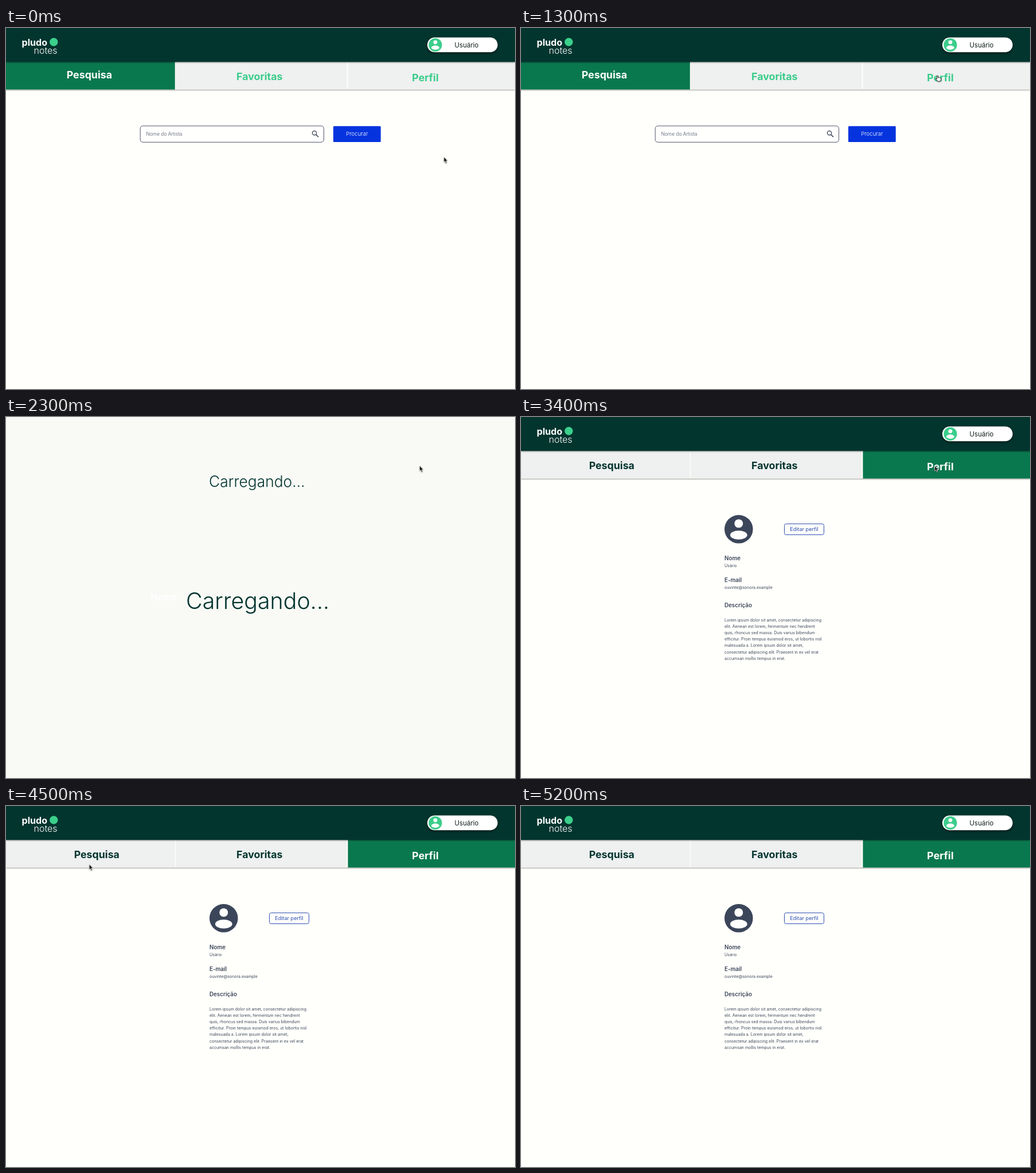
Write an HTML page that moves like this. It is 888 by 630 pixels and loops after 6400 ms.

```html
<!DOCTYPE html>
<html lang="pt-BR">
<head>
<meta charset="utf-8">
<title>Perfil</title>
<style>
  html, body { margin: 0; width: 100%; height: 100%; overflow: hidden; background: #fffffb; }
  svg { display: block; width: 888px; height: 630px; font-family: Inter, Roboto, sans-serif; }
  .bold { font-weight: 700; font-size: 17.8px; }
  .light { font-weight: 300; }
  .label { font-weight: 600; font-size: 9.8px; }
  .small { font-size: 7px; }
  .tabs { text-anchor: middle; }
  .bar { filter: drop-shadow(0 1.5px 1px #0007); }
  .pill { filter: drop-shadow(0 2px 2px #0008); }
  #arrow, #hand { filter: drop-shadow(0 1px 1px #0005); }
</style>
</head>
<body>
<svg viewBox="0 0 888 630">
  <defs>
    <g id="avatar">
      <circle r="10"/>
      <circle cy="-4" r="3" fill="#fffffd"/>
      <ellipse cy="4.1" rx="6" ry="3.15" fill="#fffffd"/>
    </g>
  </defs>

  <g id="search">
    <g id="searchTabs" class="bold tabs"></g>
    <rect x="234.2" y="170.9" width="320.3" height="28.4" rx="4.5" fill="#fffffe" stroke="#3d4558" stroke-width=".9"/>
    <text class="light" x="244.5" y="188" font-size="8.4" fill="#4c5365">Nome do Artista</text>
    <g transform="translate(538 183.3)" fill="none" stroke="#2f374a" stroke-width="1.2">
      <circle r="3.6"/><path d="M2.7 2.7 7 7" stroke-width="1.6"/>
    </g>
    <rect x="571" y="171.2" width="82.8" height="27.8" rx="1.5" fill="#0534df"/>
    <text class="light" x="612.4" y="188.4" font-size="9.6" text-anchor="middle" fill="#fff">Procurar</text>
  </g>

  <g id="profile" fill="#3c465a">
    <g id="profileTabs" class="bold tabs"></g>
    <use href="#avatar" transform="translate(379.8 195.8) scale(2.48)"/>
    <rect x="459.5" y="186.5" width="69" height="19" rx="3" fill="none" stroke="#2f4fb4"/>
    <text x="494" y="199" font-size="9.1" text-anchor="middle" fill="#2f4fb4">Editar perfil</text>
    <text class="label" x="355" y="249.8">Nome</text>
    <text class="small" x="355" y="262">Usário</text>
    <text class="label" x="355" y="288">E-mail</text>
    <text class="small" x="355" y="300.3">ouvinte@sonora.example</text>
    <text class="label" x="355" y="332.3">Descrição</text>
    <g id="description" class="small"></g>
  </g>

  <g id="header">
    <rect class="bar" width="888" height="59.2" fill="#03352f"/>
    <text class="bold" x="27.5" y="31" fill="#fff" style="font-size:16.1px">pludo</text>
    <text class="light" x="48.5" y="45" fill="#fff" font-size="16">notes</text>
    <circle cx="83.3" cy="24.5" r="7.2" fill="#3bd08c"/>
    <rect class="pill" x="735" y="16.5" width="122.7" height="25.8" rx="12.9" fill="#fff"/>
    <use href="#avatar" transform="translate(749 29.5) scale(1.16)" fill="#3bcd8b"/>
    <text x="782.5" y="33.5" font-size="11.5" fill="#10201d">Usuário</text>
  </g>

  <g id="loading">
    <rect width="888" height="630" fill="#f9faf6"/>
    <text class="label" x="252.5" y="319.5" fill="#fff" style="font-size:16px">Nome</text>
    <g class="light" fill="#03352f">
      <text x="354" y="122" font-size="26.4">Carregando...</text>
      <text x="314" y="335" font-size="39.4">Carregando...</text>
    </g>
  </g>

  <g id="pointer">
    <path id="arrow" fill="#171717" stroke="#fff" stroke-width=".6"
      d="M0 0V9.3L2 7.5 3.6 11.2 5.1 10.5 3.6 6.9H6.4z"/>
    <path id="hand" transform="translate(-3 -1)" fill="#fff" stroke="#222" stroke-width=".9" stroke-linejoin="round"
      d="M3 6.8V1.4Q3 .5 3.9 .5T4.8 1.4V4Q6 3.2 6.7 4.1 7.8 3.5 8.4 4.5 10.2 4 10.2 5.6V7.5L9.2 10.5H4.4L1 6.6Q.8 5.4 2 5.8z"/>
  </g>
</svg>
<script>
const LOOP = 6400, STEP = 100;
const HOVER = 900, LOADING = 2300, PROFILE = 3400, LEAVE = 5200;
const $ = id => document.getElementById(id);

function tab(label, x, width, center, baseline, fill, color) {
  return `<rect x="${x}" y="59" width="${width}" height="48.4" fill="${fill}"/>
    <text x="${center}" y="${baseline}" fill="${color}">${label}</text>`;
}

// The selected Pesquisa label sits a little up and to the left.
function tabs(selected, idleColor) {
  const style = name => name === selected ? ['#0a784f', '#fff'] : ['#eff0f0', idleColor];
  const label = selected === 'Pesquisa' ? [145.4, 88.3] : [158.3, 91];
  return '<rect class="bar" y="59" width="888" height="48.4" fill="#fffffb"/>' +
    tab('Pesquisa', 0, 294.8, ...label, ...style('Pesquisa')) +
    tab('Favoritas', 296, 298.5, 442.3, 91, ...style('Favoritas')) +
    tab('Perfil', 596.5, 291.5, 731.5, 93.3, ...style('Perfil'));
}
$('searchTabs').innerHTML = tabs('Pesquisa', '#3bcd8b');
$('profileTabs').innerHTML = tabs('Perfil', '#03352f');

$('description').innerHTML = [
  'Lorem ipsum dolor sit amet, consectetur adipiscing',
  'elit. Aenean est lorem, fermentum nec hendrerit',
  'quis, rhoncus sed massa. Duis varius bibendum',
  'efficitur. Proin tempus euismod eros, ut lobortis nisl',
  'malesuada a. Lorem ipsum dolor sit amet,',
  'consectetur adipiscing elit. Praesent in ex vel erat',
  'accumsan mollis tempus in erat.'
].map((line, i) => `<text x="355" y="${357 + i * 11.1}">${line}</text>`).join('');

const easeOut = k => 1 - (1 - k) ** 3;
const easeIn = k => k ** 1.2;
const origin = { x: 764, y: 225 };
const rest = { x: 721.7, y: 85 };

// Each leg curves from the end of the previous one, pulled towards "via".
const legs = [
  { start: 300, end: 400, to: { x: 791.5, y: 170.5 }, ease: easeOut },
  { start: 500, end: 1200, to: { x: 731, y: 81.5 }, via: { x: 701, y: 102 }, ease: easeOut },
  { start: 1200, end: 1600, to: rest, ease: easeOut },
  { start: 3900, end: 4600, to: { x: 119.5, y: 57.5 }, via: { x: 150, y: 212 }, ease: easeIn },
  { start: 4600, end: 5100, to: { x: 52.5, y: 4.5 }, ease: easeOut }
];

const bezier = (a, b, c, u) => (1 - u) ** 2 * a + 2 * u * (1 - u) * b + u * u * c;

function pointerAt(t) {
  let from = origin;
  for (const { start, end, to, via, ease } of legs) {
    if (t < start) break;
    if (t < end) {
      const u = ease((t - start) / (end - start));
      const mid = via || { x: (from.x + to.x) / 2, y: (from.y + to.y) / 2 };
      return { x: bezier(from.x, mid.x, to.x, u), y: bezier(from.y, mid.y, to.y, u) };
    }
    from = to;
  }
  return from;
}

const show = (id, visible) => { $(id).style.display = visible ? '' : 'none'; };

function draw(now) {
  const t = Math.floor(now % LOOP / STEP) * STEP;
  const loading = t >= LOADING && t < PROFILE;
  const hovering = t >= HOVER && t < LOADING;
  show('search', t < LOADING);
  show('loading', loading);
  show('profile', t >= PROFILE);
  show('header', !loading);
  show('pointer', t < LEAVE);
  show('arrow', !hovering);
  show('hand', hovering);
  const { x, y } = pointerAt(t);
  $('pointer').setAttribute('transform', `translate(${x} ${y})`);
  requestAnimationFrame(draw);
}
draw(performance.now());
</script>
</body>
</html>
```
